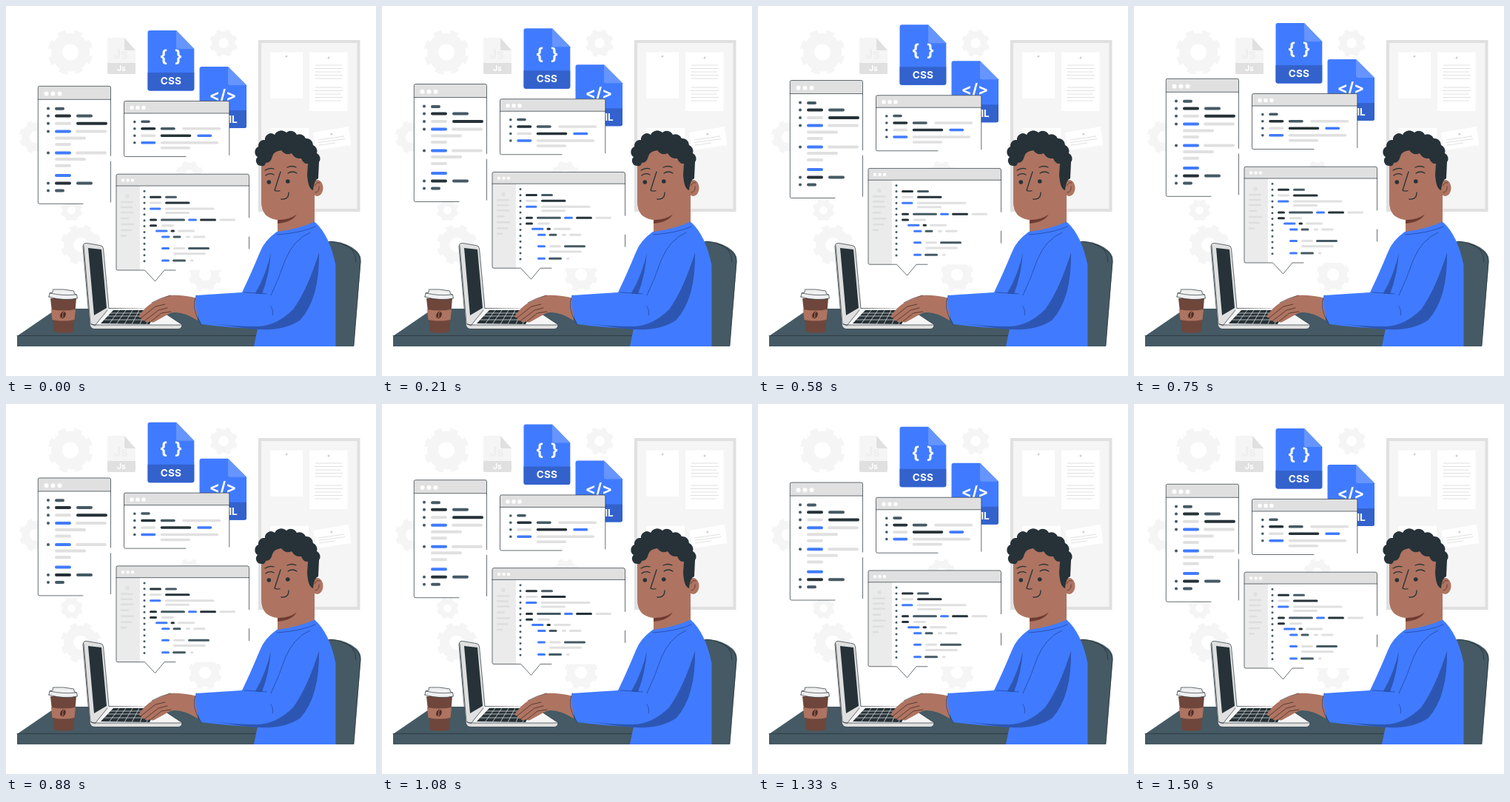
These frames come from a looping animation (500 px wide and 500 px high, 1.54 s). An HTML page:

```html
<!DOCTYPE html>
<html lang="en">
<head>
<meta charset="utf-8">
<title>Coding at a desk</title>
<style>
html, body { margin: 0; height: 100%; overflow: hidden; background: #fff; }
svg { display: block; width: 100vw; height: 100vh; fill: none; }
text { font-family: Inter, sans-serif; font-weight: 700; text-anchor: middle; fill: #fff; }
.bars { stroke-width: 4; stroke-linecap: round; }
.thin { stroke-width: 3; }
.ink { stroke: #263238; }
.slate { stroke: #455a64; }
.blue { stroke: #407bff; }
.pale { stroke: #e0e0e0; }
.white { stroke: #fff; }
.outline { stroke: #263238; stroke-width: .7; stroke-linecap: round; stroke-linejoin: round; }
.fold { stroke: #1d3f8f; stroke-width: .7; stroke-linecap: round; }
.skin { fill: #ae7461; }
.hair { fill: #263238; }
.shirt { fill: #407bff; }
.shade { fill: #2d56b3; }
.label { fill: #3362cc; }
</style>
</head>
<body>
<svg viewBox="0 0 500 500">
  <defs>
    <g id="gear" stroke="#f5f5f5">
      <circle r="18.500" stroke-width="15"/>
      <circle r="27" stroke-width="7" pathLength="16" stroke-dasharray="1 1" transform="rotate(10)"/>
    </g>
  </defs>

  <!-- backdrop -->
  <use href="#gear" transform="translate(87 62.500)"/>
  <use href="#gear" transform="translate(294 50) scale(.62)"/>
  <use href="#gear" transform="translate(40 177) scale(.73)"/>
  <use href="#gear" transform="translate(88.500 276) scale(.49)"/>
  <use href="#gear" transform="translate(101 322.500) scale(.89)"/>
  <use href="#gear" transform="translate(269 363) scale(.74)"/>
  <use href="#gear" transform="translate(248 228) scale(.62)"/>

  <path fill="#f5f5f5" d="M139 43h21l15 17v30q0 2-2 2h-34q-2 0-2-2V45q0-2 2-2z"/>
  <path fill="#e0e0e0" d="M137 77h38v13q0 2-2 2h-34q-2 0-2-2zM160 43l15 17h-13q-2 0-2-2z"/>
  <text x="155" y="71" font-size="17" style="fill:#eee">Js</text>
  <text x="156" y="88" font-size="10.500">Js</text>

  <path fill="#f5f5f5" stroke="#e0e0e0" stroke-width="4" d="M343 48h133.500v228H343z"/>
  <path fill="#fff" d="M357 62.500h44V125h-44zM410 62.500h51.500V142H410zM357 165h52v50h-52zM415 171l48-8 3.500 25-47 7z"/>
  <g class="pale">
    <path d="M418 80h36M417 84.500h38M418 89h35M417 93.500h38M418 98h36M418 110h36M417 114.500h38M418 119h35M417 123.500h38M418 128h34"/>
    <path d="M422 181l35-5M422 184.500l36-5M423 188l22-3"/>
    <path class="bars thin" stroke="#d0d0d0" d="M379 68h0M436 70h0M440 173h0"/>
  </g>

  <g id="floating">
    <g id="css-file">
      <path class="shirt" d="M194.500 33H230l24.300 25v53.500q0 3-3 3h-56.800q-3 0-3-3V36q0-3 3-3z"/>
      <path class="label" d="M191.500 90h62.800v21.500q0 3-3 3h-56.800q-3 0-3-3z"/>
      <path fill="#6695ff" d="M230 33l24.300 25h-21.300q-3 0-3-3z"/>
      <text x="223" y="76" font-size="23" word-spacing="4">{ }</text>
      <text x="223" y="106" font-size="13.600" letter-spacing=".2">CSS</text>
    </g>
    <g id="html-file">
      <path class="shirt" d="M264.500 82H300l25 25v55q0 3-3 3h-57.500q-3 0-3-3V85q0-3 3-3z"/>
      <path class="label" d="M261.500 141H325v21q0 3-3 3h-57.500q-3 0-3-3z"/>
      <path fill="#6695ff" d="M300 82l25 25h-22q-3 0-3-3z"/>
      <text x="293" y="128" font-size="21">&lt;/&gt;</text>
      <text x="293" y="158" font-size="13.600">HTML</text>
    </g>

    <g id="list-window">
      <rect x="43.300" y="108.300" width="98.200" height="159" rx="2" fill="#fff"/>
      <path fill="#e0e0e0" d="M43.300 126.300v-16q0-2 2-2h94.200q2 0 2 2v16z"/>
      <path class="outline" d="M104 267.300H45.300q-2 0-2-2v-155q0-2 2-2h94.200q2 0 2 2v92M141.500 210v55M43.300 126.300h98.200"/>
      <path class="bars white" style="stroke-width:6" d="M54.500 118.500h0M63.500 118.500h0M72.500 118.500h0"/>
      <g class="bars" transform="translate(0 .4)">
        <path class="slate" d="M57 138h0M57 148h0M57 158.300h0M57 169h0M57 198h0M57 239h0M57 249h0M68 138.300h9M97 148h18M97 239h18M68 249h9"/>
        <path class="ink" d="M68 148h18M97 158.300h38M68 239h18"/>
        <path class="blue" d="M68 169h18M68 198h18M68 228.500h18"/>
        <path class="pale" d="M68 158.300h18M96 169h38M68 178h38M68 186.500h18M96 198h38M68 206.500h38M68 215.300h18"/>
      </g>
    </g>

    <g id="wide-window">
      <rect x="159.500" y="128.500" width="142.300" height="75" rx="2" fill="#fff"/>
      <path fill="#e0e0e0" d="M159.500 145v-14.500q0-2 2-2h138.300q2 0 2 2V145z"/>
      <path class="outline" d="M243 203.500h-81.500q-2 0-2-2v-71q0-2 2-2h138.300q2 0 2 2v71M159.500 145h142.300"/>
      <path class="bars white" style="stroke-width:5.500" d="M170 137.500h0M178 137.500h0M186 137.500h0"/>
      <g class="bars" style="stroke-width:3.600" transform="translate(0 .3)">
        <path class="slate" d="M173.800 156.300h0M173.800 165.500h0M173.800 175h0M173.800 184.500h0M184 156h9M210.500 165.500h16.500"/>
        <path class="ink" d="M184 165.500h16.500M210.500 175h38"/>
        <path class="blue" d="M260 175h16.500M184 184.500h16.500"/>
        <path class="pale" d="M240 165.500h48.500M184 175h16.500M210.500 184.500h75M210.500 191.500h37"/>
      </g>
    </g>

    <g id="editor-window">
      <path fill="#fff" d="M151 227.200h175q2.500 0 2.500 2.500V355q0 2-2 2H214l-12.500 15-14-15H151q-2 0-2-2V229q0-2 2-2z"/>
      <path fill="#ebebeb" d="M149 243h32v114h-30q-2 0-2-2z"/>
      <path fill="#e0e0e0" d="M149 243v-13.800q0-2 2-2h175q2.500 0 2.500 2V243z"/>
      <path class="outline" d="M229 357h-15l-12.500 15-14-15H151q-2 0-2-2V229.200q0-2 2-2h175q2.500 0 2.500 2.500V286M328.500 312v16M149 243h179.500"/>
      <path class="bars white" style="stroke-width:4.500" d="M158 235.500h0M164.500 235.500h0M171 235.500h0"/>
      <path class="bars" stroke="#dedede" style="stroke-width:2.500" d="M156 265h15M156 272h14M156 279h15M156 287h9M156 295h16M156 303h13M156 310.500h6"/>
      <circle cx="164" cy="257" r="2.800" fill="#e0e0e0"/>
      <g class="bars thin">
        <path class="slate" d="M187 250.300v95" stroke-dasharray="0 7.870"/>
        <path class="slate" d="M216.500 258.300h13M210.500 289h30M227 312h8M247.500 327.500h26M226.500 344h15"/>
        <path class="ink" d="M195.500 258.300h13M216.500 266h30.500M195.500 289h7M263.500 289h19M195.500 296.800h7M224 304h2.500"/>
        <path class="blue" d="M195.500 274h12.500M247.500 289h9M203.500 304h13.500M211.500 312h8.500M211.500 327.500h8M211.500 344h8"/>
        <path class="pale" d="M195.500 266h13M216.500 274h63.500M216.500 279.500h30M290 289h18.500M211.500 296.800h14M233.500 304h20M244.500 312h3M254.500 312h13.500M227.500 327.500h13M227.500 334.800h41M250.500 344h1.500"/>
      </g>
    </g>
  </g>

  <!-- chair and desk -->
  <path fill="#455a64" d="M430 318h12q20 2 32 13 6 6 5.500 14L470 460h-45z"/>
  <path class="outline" d="M438 318q20 2 30 11 11 7 11 16L470 459M455 322q18 5 18 24"/>
  <path fill="#455a64" d="M15 446l54-37h290v51H15z"/>
  <path class="outline" d="M15 445.500h322"/>

  <!-- cup -->
  <path fill="#6f463b" d="M60 395h35l-4 45q-13 4-26 0z"/>
  <path class="skin" d="M61 410q16 3 33 0l-1.500 14q-15 3-30 0z"/>
  <path fill="#f0f0f0" class="outline" d="M58 393l1-5 4-1 .500-4q14-1 28 2l1 4 3 1 1 5q-18 4-38.500-2zM59 388q18 4 36 2"/>
  <g transform="rotate(25 77 417.500)">
    <ellipse cx="77" cy="417.500" rx="3.500" ry="5" fill="#4d2e28"/>
    <path stroke="#ae7461" d="M77 413q-2 3 0 5t0 4"/>
  </g>

  <!-- laptop -->
  <path class="outline" fill="#e0e0e0" d="M104 325q0-5 5-4.500l18 3q4 .500 4.500 4l7.500 81 66 1 33 21q0 6-6 6H120q-6 0-7-7z"/>
  <path fill="#f5f5f5" d="M138 409h67l32 22H121z"/>
  <path class="hair" d="M111 327l18 2 7 79-17 10z"/>
  <path class="hair" d="M145 411h58l-9 19-66-1z"/>
  <path stroke="#d6d6d6" stroke-width=".8" d="M141 415h65M137 419h65M133 424h65M153 411l-14 19M162 411l-13 19M171 411l-11 19M180 411l-10 19M189 411l-8 19M197 411l-7 19"/>
  <path class="outline" d="M115 430q5 1 6 1h116M105 324l9 105 6 3 17-21"/>

  <!-- neck, hand and shirt -->
  <path class="skin" d="M367 275l50-35v60l-50 8z"/>
  <path fill="#6f3b30" d="M367 288q14 0 27-9-5 13-27 15z"/>
  <path class="skin" d="M259 395q-22-5-37-4-12 4-24 10-9 5-18 17-1 4 3 3-1 5 4 4 2 4 8 1 2 3 7 0l20-11q14-4 37 10z"/>
  <path class="outline" style="stroke:#3a2520" d="M183 421l19-15 13-3M188 425l18-14 12-3M196 426l14-11 13-2M222 391q-12 3-25 10"/>
  <path class="shirt" d="M366 305q28-3 51-13.500 20 17.500 28.500 58.500v110H335l5-24q-40-1-76-6-10-18-7-39l62-4q12-25 24-54 6-16 23-28z"/>
  <path class="shade" d="M358 333q-6 29-21 55l9 1q10-26 12-56z"/>
  <path class="shade" d="M423 333q1 62-25 91-26 19-78 11l-57-8q38 6 77 6 26-1 48-23 20-28 35-77z"/>
  <path class="fold" d="M411 306q-23 10-34 38-8 24-19 47M322 387l30 2M257 391q-8 18 7 40M358 406q4 7 2 12M418 298q-20 9-52 11"/>

  <!-- head -->
  <ellipse class="skin" cx="420.500" cy="246" rx="8" ry="11"/>
  <path class="skin" d="M345 203q30-28 70-4v52q-7 20-21 30-13 9-28 8-21-3-21-24z"/>
  <path class="hair" d="M345 216A7 7 0 0 1 340 204A8 8 0 0 1 341 190A8 8 0 0 1 350 181A8 8 0 0 1 363 174A10 10 0 0 1 379 171A9 9 0 0 1 393 174A9 9 0 0 1 405 179A9 9 0 0 1 415 188A9 9 0 0 1 420 199A8 8 0 0 1 423 211L422 233Q416 235 415 249Q408 247 407 228L408 213Q402 214 399 206Q390 207 386 199Q378 203 372 195Q362 196 360 203Q358 212 351 212Q350 217 345 216z"/>
  <path class="outline" style="stroke:#4b2a23" d="M417 243q3-6 7-4M418 252q6-1 5-8"/>
  <path class="outline" style="stroke-width:1.300" d="M371 224l-8 25q4 2 7 .500M372 261q10 1 10-9M350 222q6-4 12-2M380 218q7-3 12 0M351 229q5-4 11-1M381 226q6-4 12 0"/>
  <path class="bars ink" style="stroke-width:5.600" d="M355.300 238h0M380.800 237h0"/>
</svg>
<script>
const floating = document.getElementById('floating');
const LOOP = 1540, STEPS = 37, RISE = 10;

// A linear 1.5 s rise and fall, stepped at 24 images per second.
function draw(now) {
  const step = Math.floor(((now % LOOP) + 5) / LOOP * STEPS) % STEPS;
  const y = -RISE * (1 - Math.abs(1 - step / 18));
  floating.setAttribute('transform', `translate(0 ${y.toFixed(3)})`);
  requestAnimationFrame(draw);
}
draw(performance.now());
</script>
</body>
</html>
```
